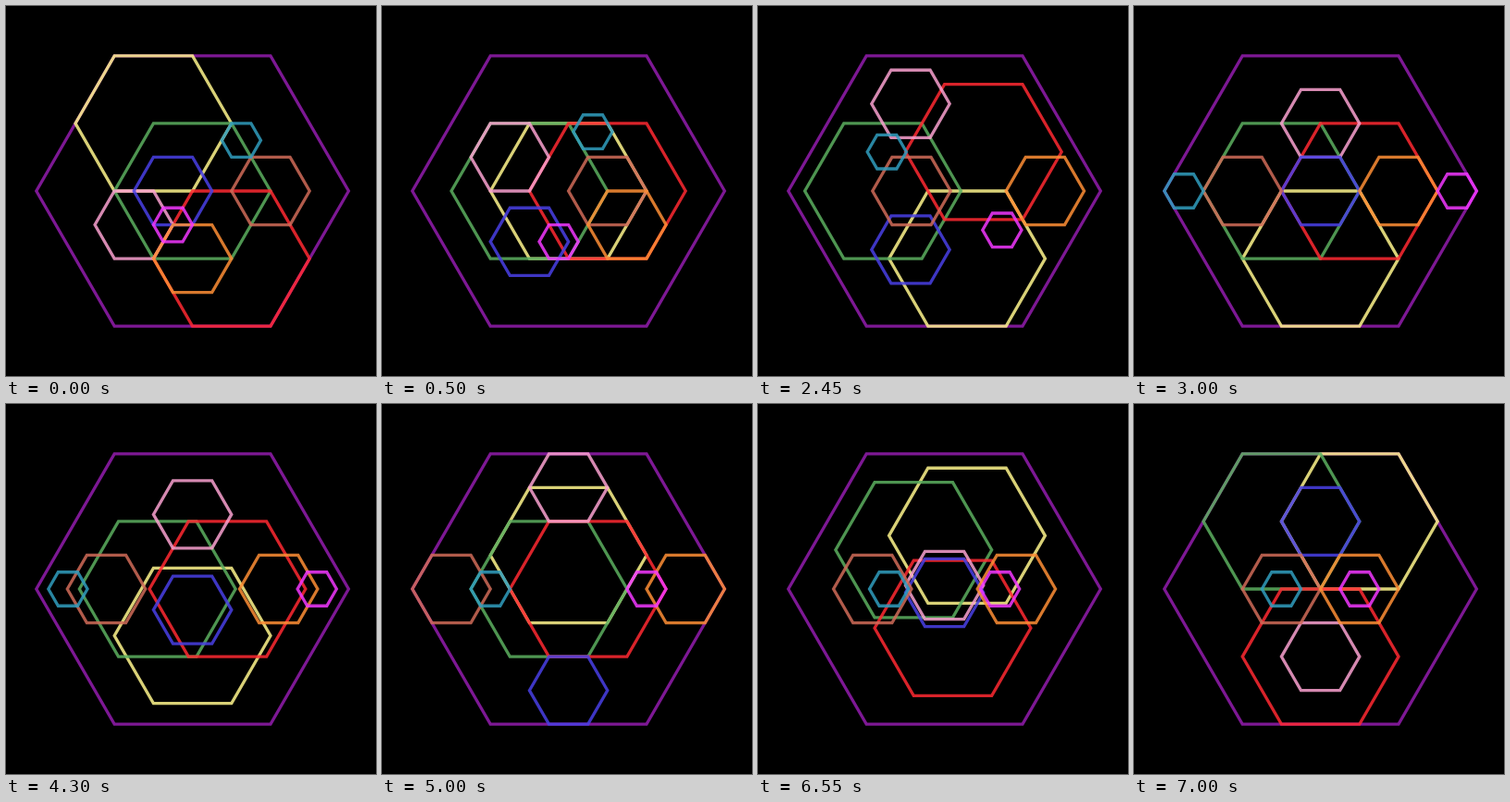
Recreate the animation shown at these times as an HTML page. Size 400 by 400 pixels, loop 8000 ms.

```html
<!DOCTYPE html>
<html lang="en">
<head>
<meta charset="utf-8">
<title>Hexagons</title>
<style>
  html, body { margin: 0; width: 100%; height: 100%; overflow: hidden; background: #000; }
  svg { display: block; width: 100%; height: 100%; }
  polygon { fill: none; stroke-width: 3.3; stroke-opacity: .85; }
  #stage { filter: blur(.7px); }
</style>
</head>
<body>
<svg viewBox="0 0 400 400"><g id="stage" transform="translate(201.6 200)"></g></svg>
<script>
const LOOP = 8000, SEGMENT = 2000, MOVE = 1000, STEP = 50;
const RADIUS = 168.8, UNIT = RADIUS / 8;
const SIN60 = Math.sin(Math.PI / 3);

// Each stop of a route is a compass walk from the centre, counted in
// steps of the smallest hexagon; "+" joins two walks. Painted back to front.
const sizes = [
  { radius: RADIUS, shapes: { '#931dae': 'O O O O O' } },
  { radius: RADIUS / 2, shapes: {
    '#fff68c': 'NW4 SE4 S2 N1 NE4',
    '#5cb060': 'O W4 W2 W1 NW4',
    '#ff2a32': 'SE4 NE4 E2 E1 S2'
  } },
  { radius: RADIUS / 4, shapes: {
    '#fba2d1': 'W2+SW2 NW6 N2 N3 S2',
    '#4940e6': 'W1 SW6 O S3 N2',
    '#d16c59': 'E4 O W4 W6 W2',
    '#fe8f36': 'S2 E6 E4 E6 E2'
  } },
  { radius: RADIUS / 8, shapes: {
    '#319ebf': 'NE3+E1 N2 W7 W4 W2',
    '#f338ff': 'SW2 S2 E7 E4 E2'
  } }
];

// E and W point to corners, N and S to flat sides, the rest to slanted corners.
function walk(text) {
  const [, name, steps] = text.match(/([A-Z]+)(\d*)/);
  const dx = name.includes('E') - name.includes('W');
  const dy = name.includes('S') - name.includes('N');
  const slant = dx && dy ? 0.5 : 1;
  return [dx * slant * steps * UNIT, dy * slant * steps * UNIT * 2 * SIN60];
}

const stop = text => text.split('+').map(walk)
  .reduce(([ax, ay], [bx, by]) => [ax + bx, ay + by]);

const corners = r => Array.from({ length: 6 }, (_, i) => {
  const angle = i * Math.PI / 3;
  return `${r * Math.cos(angle)},${r * Math.sin(angle)}`;
}).join(' ');

function hexagon(radius, color, route) {
  const node = document.createElementNS('http://www.w3.org/2000/svg', 'polygon');
  node.setAttribute('points', corners(radius));
  node.setAttribute('stroke', color);
  document.getElementById('stage').append(node);
  return { node, stops: route.split(' ').map(stop) };
}

const hexagons = sizes.flatMap(({ radius, shapes }) =>
  Object.entries(shapes).map(([color, route]) => hexagon(radius, color, route)));

const ease = p => (1 - Math.cos(Math.PI * p)) / 2;

function draw(time) {
  const t = Math.floor(time % LOOP / STEP) * STEP;
  const leg = Math.floor(t / SEGMENT);
  const k = ease(Math.min(1, t % SEGMENT / MOVE));
  for (const { node, stops } of hexagons) {
    const [x, y] = stops[leg].map((a, i) => a + (stops[leg + 1][i] - a) * k);
    node.setAttribute('transform', `translate(${x} ${y})`);
  }
}

const start = performance.now();
function tick() {
  draw(performance.now() - start);
  requestAnimationFrame(tick);
}
tick();
</script>
</body>
</html>
```
